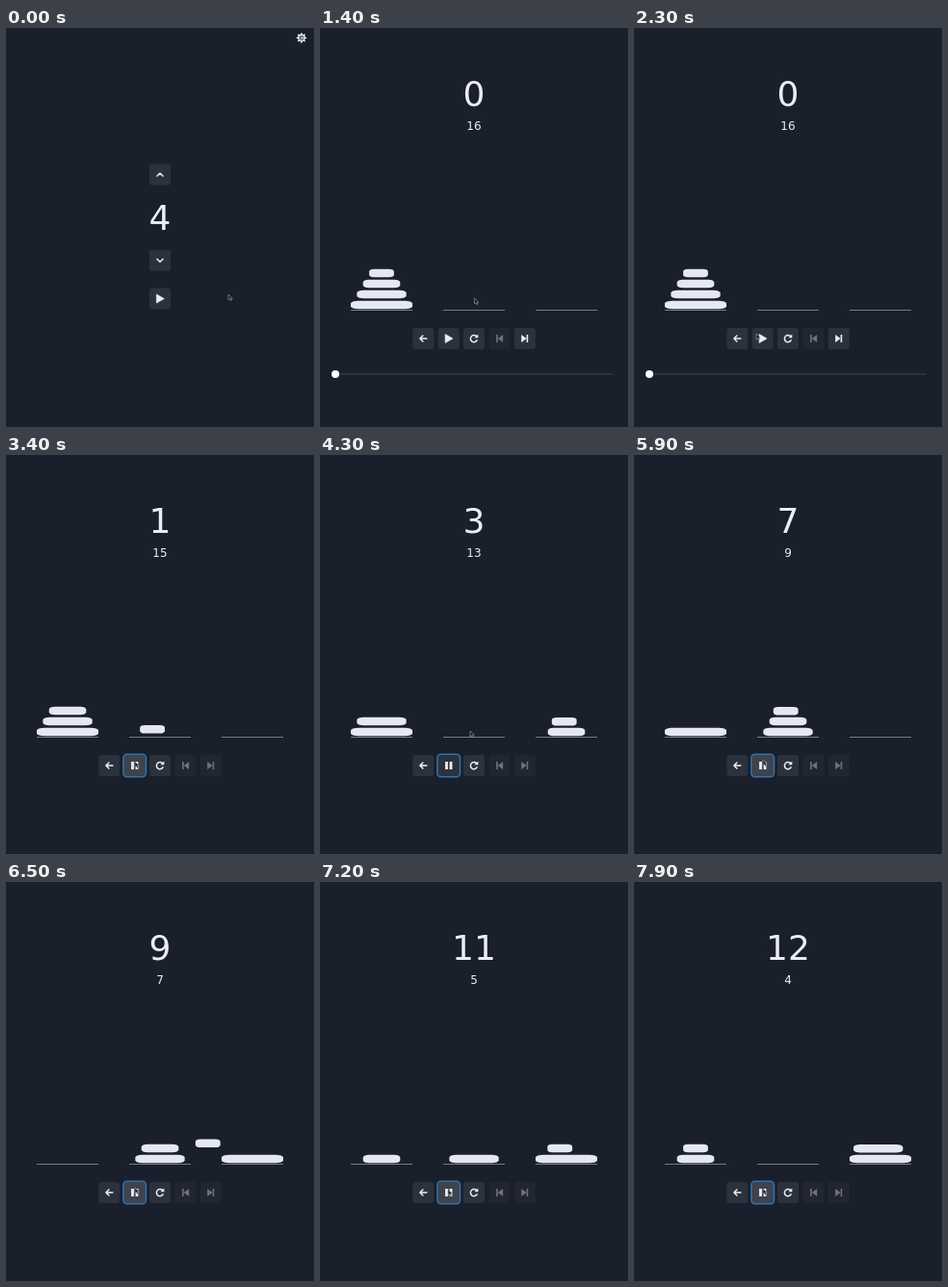
These frames come from a looping animation (320x415 px, 8000 ms). An HTML page:

```html
<!DOCTYPE html>
<html lang="en">
<head>
<meta charset="utf-8">
<title>Tower of Hanoi</title>
<style>
  html, body { margin: 0; width: 100%; height: 100%; overflow: hidden; background: #191f2b; }
  svg { display: block; width: 100%; height: 100%; }
  text { font-family: "DejaVu Sans", Verdana, sans-serif; fill: #ebecf5; text-anchor: middle; }
  .big { font-size: 36px; }
  .small { font-size: 12px; }
  .btn { fill: #fff; fill-opacity: .085; }
  .solid { fill: #eeeff5; }
  .line { fill: none; stroke: #eeeff5; stroke-width: 1.5; stroke-linecap: round; stroke-linejoin: round; }
</style>
</head>
<body>
<svg viewBox="0 0 320 415">
  <defs>
    <rect id="btn" class="btn" x="-11" y="-11" width="22" height="22" rx="3"/>
    <path id="tri" class="solid" d="M-3.6-4.6V4.6L4.3 0Z" stroke="#eeeff5" stroke-width=".6" stroke-linejoin="round"/>
    <g id="skip"><path class="solid" d="M-3.6-4V4L1.8 0Z"/><path class="solid" d="M1.8-4h1.6v8H1.8Z"/></g>
  </defs>

  <g id="setup">
    <g id="gear" transform="translate(307 10.3)">
      <circle class="line" r="3.2" stroke-width="1.3"/>
      <circle class="line" r="1.2" style="stroke-width:.9"/>
    </g>
    <g transform="translate(160 152.5)"><use href="#btn"/><path class="line" d="M-3 1.5 0-1.5 3 1.5"/></g>
    <text class="big" x="160" y="209.5">4</text>
    <g transform="translate(160 241.7)"><use href="#btn"/><path class="line" d="M-3-1.5 0 1.5 3-1.5"/></g>
    <g transform="translate(160 281.5)"><use href="#btn"/><use href="#tri"/></g>
  </g>

  <g id="game">
    <text id="done" class="big" x="160" y="80.5"></text>
    <text id="left" class="small" x="160" y="105.8"></text>
    <path d="M32 293.5h64m32 0h64m32 0h64" stroke="#737b8d" stroke-width="1.2"/>
    <g id="disks" fill="#e5e8f3"></g>
    <g transform="translate(107.3 323)"><use href="#btn"/><path class="line" d="M3.6 0H-3.4M-.4-3-3.4 0-.4 3"/></g>
    <g transform="translate(133.7 323)">
      <rect id="ring" x="-11.8" y="-11.8" width="23.6" height="23.6" rx="3.8" fill="none" stroke="#3271ab" stroke-width="1.6"/>
      <use href="#btn"/>
      <use id="hover" href="#btn"/>
      <use id="play" href="#tri"/>
      <path id="pause" class="solid" d="M-3.6-4h2.8v8h-2.8ZM.9-4h2.8v8H.9Z"/>
    </g>
    <g transform="translate(160 323)"><use href="#btn"/><path class="line" d="M3.1 1.9A3.6 3.6 0 1 1 2.4-2.6"/><path class="solid" d="M4.3-4.6V-.8H.5Z"/></g>
    <g transform="translate(186.5 323)" opacity=".4"><use href="#btn"/><use href="#skip" transform="scale(-1 1)"/></g>
    <g id="next" transform="translate(212.8 323)"><use href="#btn"/><use href="#skip"/></g>
    <g id="slider">
      <rect x="16" y="359" width="288" height="2" rx="1" fill="#2c323d"/>
      <circle cx="16" cy="360" r="4" fill="#fff"/>
    </g>
  </g>

  <path id="cursor" d="M0 0V5.8L1.4 4.6 2.4 6.6 3.5 6.1 2.6 4.2H4.3Z" fill="#11151d" stroke="#a9adb6" stroke-width=".6" stroke-linejoin="round"/>
</svg>
<script>
const LOOP = 8000, START = 1400, PLAY = 3100, STEP = 400, LAST = 12, COUNT = 4;
const $ = id => document.getElementById(id);
const NS = 'http://www.w3.org/2000/svg';
const show = (id, on) => $(id).setAttribute('visibility', on ? 'inherit' : 'hidden');
const lerp = (a, b, p) => a + (b - a) * p;
const clamp = v => Math.min(1, Math.max(0, v));

// time, x, y of the pointer tip
const path = [
  [300, 231, 277], [650, 195, 296], [1000, 159, 283], [1300, 159, 283],
  [1650, 164, 276], [2000, 167, 276], [2200, 143, 300], [2300, 127, 318],
  [2500, 121, 320], [2900, 134, 319], [3900, 134, 319], [4100, 146, 303],
  [4300, 156, 287], [4800, 150, 296], [5300, 139, 309], [5700, 134, 317],
  [6500, 134, 318], [7100, 133, 320], [7900, 134, 319]
];

for (let i = 0; i < 8; i++) {
  const tooth = document.createElementNS(NS, 'path');
  tooth.setAttribute('d', 'M0-3.4V-4.6');
  tooth.setAttribute('class', 'line');
  tooth.setAttribute('transform', `rotate(${i * 45})`);
  $('gear').append(tooth);
}

const widthOf = i => 25.8 + i * 12.75;
const disks = Array.from({ length: COUNT }, (_, i) => {
  const w = widthOf(i), r = document.createElementNS(NS, 'rect');
  const attrs = { x: -w / 2, y: -4.3, width: w, height: 8.6, rx: 3 + w * .08, ry: 2.8 };
  for (const k in attrs) r.setAttribute(k, attrs[k]);
  $('disks').append(r);
  return r;
});

// cubic-bezier(.25, .1, .25, 1)
function ease(x) {
  if (x <= 0 || x >= 1) return clamp(x);
  const bez = (a, b, u) => 3 * a * u * (1 - u) ** 2 + 3 * b * u * u * (1 - u) + u ** 3;
  let lo = 0, hi = 1;
  for (let i = 0; i < 24; i++) {
    const mid = (lo + hi) / 2;
    if (bez(.25, .25, mid) < x) lo = mid; else hi = mid;
  }
  return bez(.1, 1, lo);
}

const moveStart = k => k === 1 ? 3140 : 3180 + STEP * (k - 1);
const spot = (peg, level) => [64 + peg * 96, 288 - level * 11];

function drawDisks(t) {
  const height = [COUNT, 0, 0];
  const peg = disks.map(() => 0);
  const pos = disks.map((_, i) => spot(0, COUNT - 1 - i));
  let done = 0;
  for (let k = 1; k <= LAST && t >= moveStart(k); k++) {
    const d = Math.log2(k & -k);
    const to = (peg[d] + (d % 2 ? 2 : 1)) % 3;
    const p = ease((t - moveStart(k)) / STEP);
    height[peg[d]]--;
    const end = spot(to, height[to]++);
    pos[d] = pos[d].map((v, i) => lerp(v, end[i], p));
    peg[d] = to;
    done = k;
  }
  disks.forEach((r, i) => r.setAttribute('transform', `translate(${pos[i]})`));
  $('done').textContent = done;
  $('left').textContent = 16 - done;
}

function pointer(t) {
  const i = path.findIndex(p => p[0] > t);
  if (i === 0) return path[0].slice(1);
  if (i < 0) return path[path.length - 1].slice(1);
  const [a, b] = [path[i - 1], path[i]];
  const p = (t - a[0]) / (b[0] - a[0]);
  return [lerp(a[1], b[1], p), lerp(a[2], b[2], p)];
}

function render(t) {
  const playing = t >= PLAY;
  show('setup', t < START);
  show('game', t >= START);
  show('slider', !playing);
  show('ring', playing);
  show('play', !playing);
  show('pause', playing);
  $('next').setAttribute('opacity', playing ? .4 : 1);
  const fade = (from, to) => clamp((t - from) / 150) * clamp((to - t) / 150);
  $('hover').setAttribute('opacity', fade(2320, 4150) + fade(5420, 9000));
  drawDisks(t);
  $('cursor').setAttribute('transform', `translate(${pointer(t)})`);
}

const t0 = performance.now();
function tick() {
  render((performance.now() - t0) % LOOP);
  requestAnimationFrame(tick);
}
tick();
</script>
</body>
</html>
```
